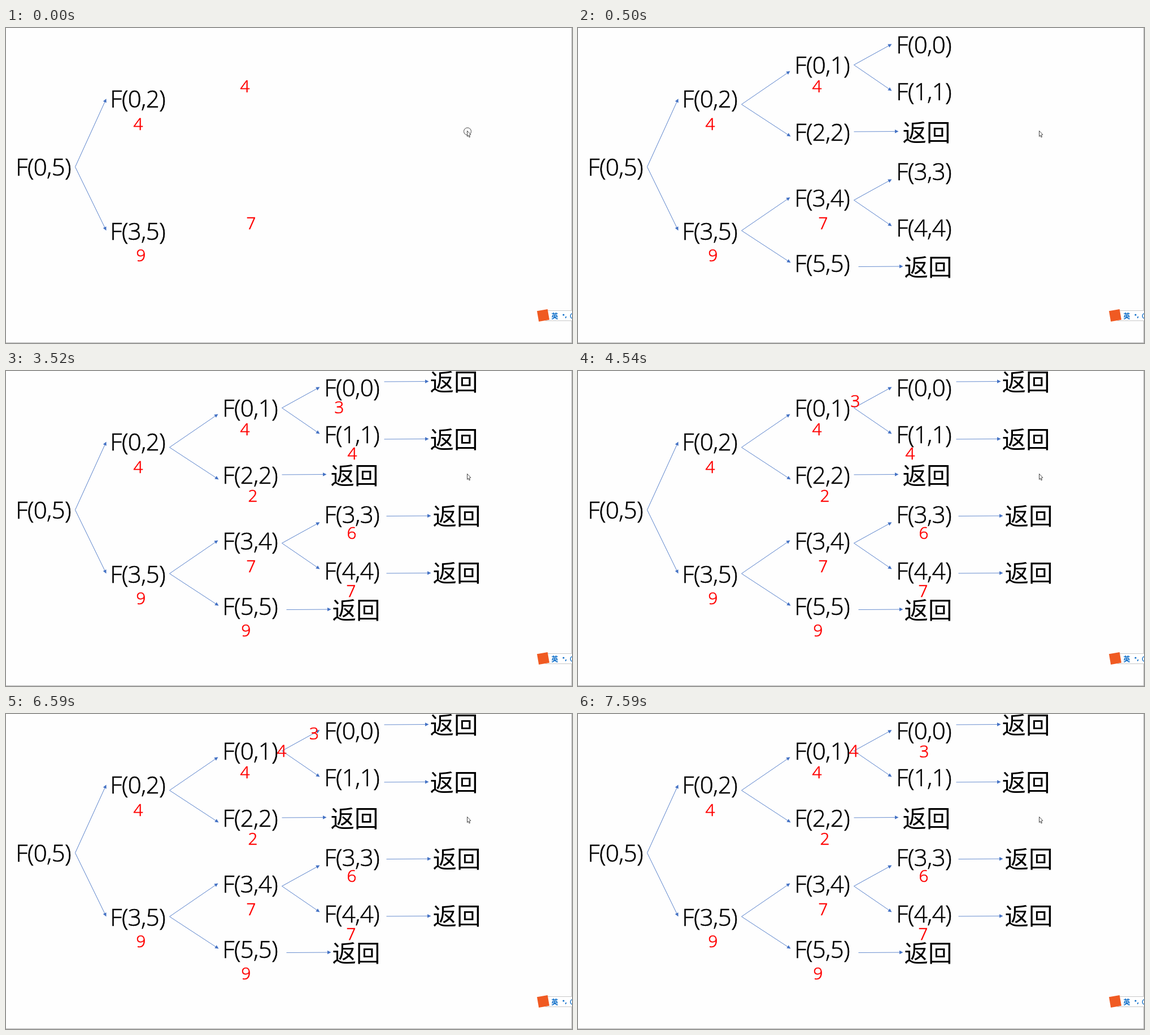
Write an HTML page with a canvas that moves like this. It is 1002x559 px and loops after 8000 ms.

```html
<!DOCTYPE html>
<html lang="zh">
<head>
<meta charset="utf-8">
<title>递归过程</title>
<style>
html, body { margin: 0; width: 100%; height: 100%; overflow: hidden; background: #fefefe; }
canvas { display: block; width: 1002px; height: 559px; }
</style>
</head>
<body>
<canvas id="stage" width="1002" height="559"></canvas>
<script>
const ctx = document.getElementById('stage').getContext('2d');
const LOOP = 8000;
const LATIN = '"Open Sans", "Noto Sans", sans-serif';
const CJK = '"Noto Sans CJK SC", "Noto Sans CJK", sans-serif';
const BLUE = '#4472c4';

function write(text, x, y, font, color, weight, spacing = '0px') {
  ctx.font = font;
  ctx.letterSpacing = spacing;
  ctx.fillStyle = ctx.strokeStyle = color;
  ctx.fillText(text, x, y);
  if (weight) {
    ctx.lineWidth = weight;
    ctx.lineJoin = 'miter';
    ctx.strokeText(text, x, y);
  }
  ctx.letterSpacing = '0px';
}

function label(text, x, midY) {
  ctx.textAlign = 'left';
  write(text, x - 1.7, midY + 15, '300 42px ' + LATIN, '#000', 0.6, '-0.5px');
}

function back(x, midY) {
  ctx.textAlign = 'left';
  write('返回', x - 1.5, midY + 15, '300 42.5px ' + CJK, '#000', 0);
}

function value(digit, x, midY) {
  ctx.textAlign = 'center';
  write(digit, x, midY + 10.5, '300 29.5px ' + LATIN, '#f00', 0.7);
}

function arrow(x1, y1, x2, y2) {
  const len = Math.hypot(x2 - x1, y2 - y1);
  ctx.save();
  ctx.translate(x1 + 0.5, y1 + 0.5);
  ctx.rotate(Math.atan2(y2 - y1, x2 - x1));
  ctx.strokeStyle = ctx.fillStyle = BLUE;
  ctx.lineWidth = 0.8;
  ctx.beginPath();
  ctx.moveTo(0, 0);
  ctx.lineTo(len - 5, 0);
  ctx.stroke();
  ctx.beginPath();
  ctx.moveTo(len, 0);
  ctx.lineTo(len - 6.5, -3.2);
  ctx.lineTo(len - 6.5, 3.2);
  ctx.fill();
  ctx.restore();
}

function fork(x, y, tipX, topY, lowX, lowY) {
  arrow(x, y, tipX, topY);
  arrow(x, y, lowX, lowY);
}

function goBack(x, y, textX, midY) {
  arrow(x, y, x + 79, y - 0.5);
  back(textX, midY);
}

function cursor(ring) {
  ctx.lineWidth = 0.9;
  ctx.strokeStyle = '#333';
  if (ring) {
    ctx.beginPath();
    ctx.arc(817, 183.5, 6.5, 0, Math.PI * 2);
    ctx.stroke();
  }
  ctx.fillStyle = '#fff';
  ctx.beginPath();
  ctx.moveTo(816.5, 182.5);
  for (const [x, y] of [[816.5, 192.5], [818.5, 190.5], [820, 194], [821.5, 193.3], [820, 190], [822.8, 189.3]])
    ctx.lineTo(x, y);
  ctx.closePath();
  ctx.fill();
  ctx.stroke();
}

function inputBar() {
  ctx.fillStyle = '#fff';
  ctx.fillRect(955, 501, 47, 19);
  ctx.fillStyle = '#c8c8c8';
  ctx.fillRect(955, 501, 47, 1);
  ctx.fillRect(955, 519, 47, 1);

  ctx.save();
  ctx.translate(951, 510);
  ctx.rotate(-0.17);
  ctx.fillStyle = '#f05a22';
  ctx.fillRect(-9.5, -9.5, 19, 19);
  ctx.restore();

  ctx.textAlign = 'left';
  write('英', 965.5, 515.5, '700 12px ' + CJK, '#0a6cc8', 0);
  write(',', 989.5, 513, '700 13px ' + LATIN, '#0a6cc8', 0);
  ctx.beginPath();
  ctx.arc(987, 509, 1.6, 0, Math.PI * 2);
  ctx.fill();
  ctx.lineWidth = 1.3;
  ctx.beginPath();
  ctx.arc(1004, 511, 4.8, 0, Math.PI * 2);
  ctx.stroke();
}

// [time, x, y] steps of the two travelling digits
const threePath = [[3520, 590, 64], [4540, 491, 53], [6590, 545.5, 34], [7590, 613, 66]];
const fourPath = [[3520, 613, 146], [4540, 588, 146], [5570, 491, 76], [6590, 488, 65]];

function travel(digit, path, t) {
  const step = path.filter(p => p[0] <= t).pop();
  if (step) value(digit, step[1], step[2]);
}

function tree() {
  fork(488, 65, 555, 28, 555, 111);
  fork(488, 305, 555, 268, 555, 351);
  fork(289, 135, 375, 76, 376, 192);
  fork(289, 359, 375, 300, 376, 416);
  label('F(0,1)', 385, 66);
  label('F(2,2)', 385, 185);
  label('F(3,4)', 385, 302);
  label('F(5,5)', 385, 418);
  label('F(0,0)', 565, 30);
  label('F(1,1)', 565, 113);
  label('F(3,3)', 565, 255);
  label('F(4,4)', 565, 355);
  goBack(488, 183.5, 576, 186);
  goBack(496, 423, 579, 425);
}

function draw(t) {
  ctx.fillStyle = '#fefefe';
  ctx.fillRect(0, 0, 1002, 559);

  fork(122, 246, 177, 125, 177, 359);
  label('F(0,5)', 19, 247);
  label('F(0,2)', 186, 126);
  label('F(3,5)', 186, 361);

  if (t >= 500) tree();
  if (t >= 2520) {
    goBack(669, 18.5, 752, 20);
    goBack(669, 120.5, 752, 122);
    goBack(673, 257, 757, 258);
    goBack(673, 358.5, 757, 359);
  }

  value('4', 423, 103);
  value('4', 234, 170);
  value('7', 434, 346);
  value('9', 239, 403);
  if (t >= 3520) {
    value('2', 437, 221);
    value('6', 612, 287);
    value('7', 611, 390);
    value('9', 425, 460);
  }
  travel('3', threePath, t);
  travel('4', fourPath, t);

  cursor(t < 500 || (t >= 2520 && t < 3520));
  ctx.fillStyle = '#b4b4b4';
  ctx.fillRect(1001, 0, 1, 559);
  ctx.fillRect(0, 558, 1002, 1);
  inputBar();
}

const start = performance.now();
function frame(now) {
  draw(Math.max(0, now - start) % LOOP);
  requestAnimationFrame(frame);
}
draw(0);
requestAnimationFrame(frame);
</script>
</body>
</html>
```
